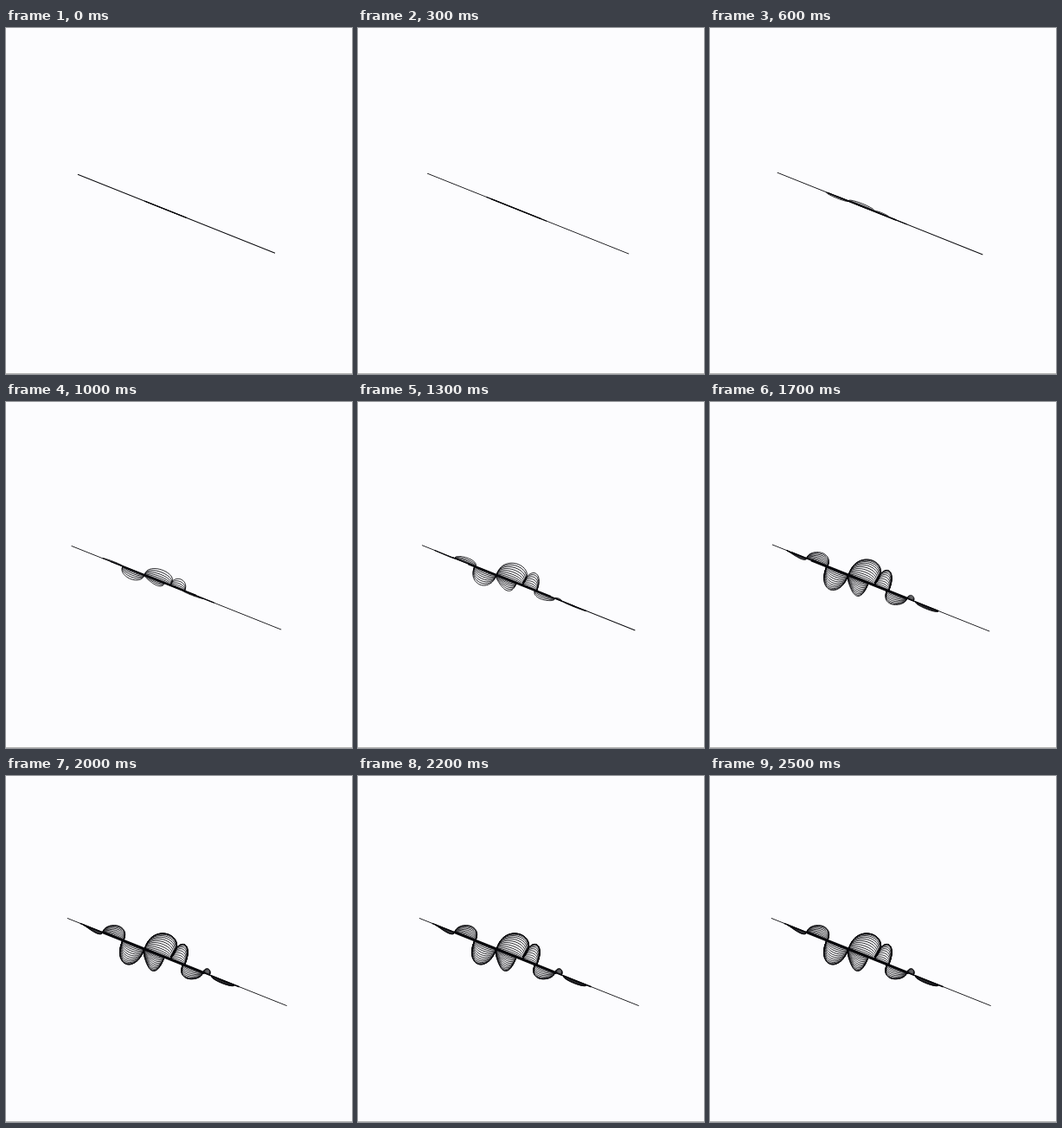
Write an HTML page with a canvas that moves like this. It is 400 px wide and 400 px high and loops after 2.6 s.

```html
<!DOCTYPE html>
<html lang="en">
<head>
<meta charset="utf-8">
<title>Growing wave</title>
<style>
html, body { margin: 0; width: 100%; height: 100%; overflow: hidden; background: #fcfcfe; }
canvas { display: block; }
</style>
</head>
<body>
<canvas id="stage" width="400" height="400"></canvas>
<script>
const ctx = document.getElementById('stage').getContext('2d');
const LOOP = 2600, STEP = 100, LAST = 19, POINTS = 28;

// Bulges along the tilted axis: place, width, signed height, growth time in ms.
// tilt raises one side of the top, lean pushes the far side outwards.
const lobes = [
  { x: -77, w: 25, h: 2.8, from: 1100, to: 1900, tilt: 0.9 },
  { x: -52, w: 26, h: -13.5, from: 800, to: 1900, tilt: 0.15 },
  { x: -27, w: 27, h: 24, from: 350, to: 1800 },
  { x: 0, w: 32, h: -26, from: 300, to: 1700, lean: 8 },
  { x: 0, w: 25, h: 18, from: 500, to: 1900, tilt: 0.5 },
  { x: 32, w: 18, h: -22, from: 400, to: 1600 },
  { x: 48, w: 25, h: 13, from: 800, to: 1800, tilt: -0.2 },
  { x: 73, w: 8, h: -6, from: 1000, to: 1900 },
  { x: 84, w: 28, h: 3.5, from: 1000, to: 1900 }
];

const mix = (a, b, k) => a + (b - a) * k;
const ramp = (t, a, b) => Math.min(1, Math.max(0, (t - a) / (b - a)));
const smooth = k => k * k * (3 - 2 * k);

function axis(x1, x2, width) {
  ctx.lineWidth = width;
  ctx.beginPath();
  ctx.moveTo(x1, 0);
  ctx.lineTo(x2, 0);
  ctx.stroke();
}

function outline({ x, w, h, from, to, tilt = 0, lean = 0 }, t) {
  const grow = smooth(ramp(t, from, to));
  if (!grow) return;
  ctx.beginPath();
  for (let i = 0; i <= POINTS; i++) {
    const u = (1 - Math.cos(Math.PI * i / POINTS)) / 2;
    const bulge = grow * Math.sin(Math.PI * Math.min(u, 1 - u)) ** 0.35;
    ctx.lineTo(x + w * u + lean * bulge * u, h * bulge * (1 + tilt * (2 * u - 1)));
  }
  ctx.stroke();
}

function draw(time) {
  const step = Math.min(LAST, Math.floor(time % LOOP / STEP));
  const t = step * STEP, k = step / LAST;
  ctx.fillStyle = '#fcfcfe';
  ctx.fillRect(0, 0, 400, 400);
  ctx.fillStyle = '#b4b4b4';
  ctx.fillRect(0, 399, 400, 1);

  ctx.save();
  ctx.translate(160, 200);
  ctx.rotate(Math.atan(0.399));
  ctx.strokeStyle = '#08080c';
  ctx.lineJoin = 'round';
  axis(-83 - 5 * ramp(t, 0, 500) - 8 * ramp(t, 500, 1900), mix(162.6, 177.3, k), 0.9);
  axis(mix(0, -80, k), mix(52, 118, k), mix(1, 1.5, k));
  axis(mix(2, -52, k), mix(52, 75, k), mix(1.1, 3, k));

  ctx.lineWidth = 0.8;
  for (let s = 0; s <= step; s++)
    for (const lobe of lobes) outline(lobe, s * STEP);
  ctx.restore();
}

const begin = performance.now();
function frame() {
  draw(performance.now() - begin);
  requestAnimationFrame(frame);
}
frame();
</script>
</body>
</html>
```
